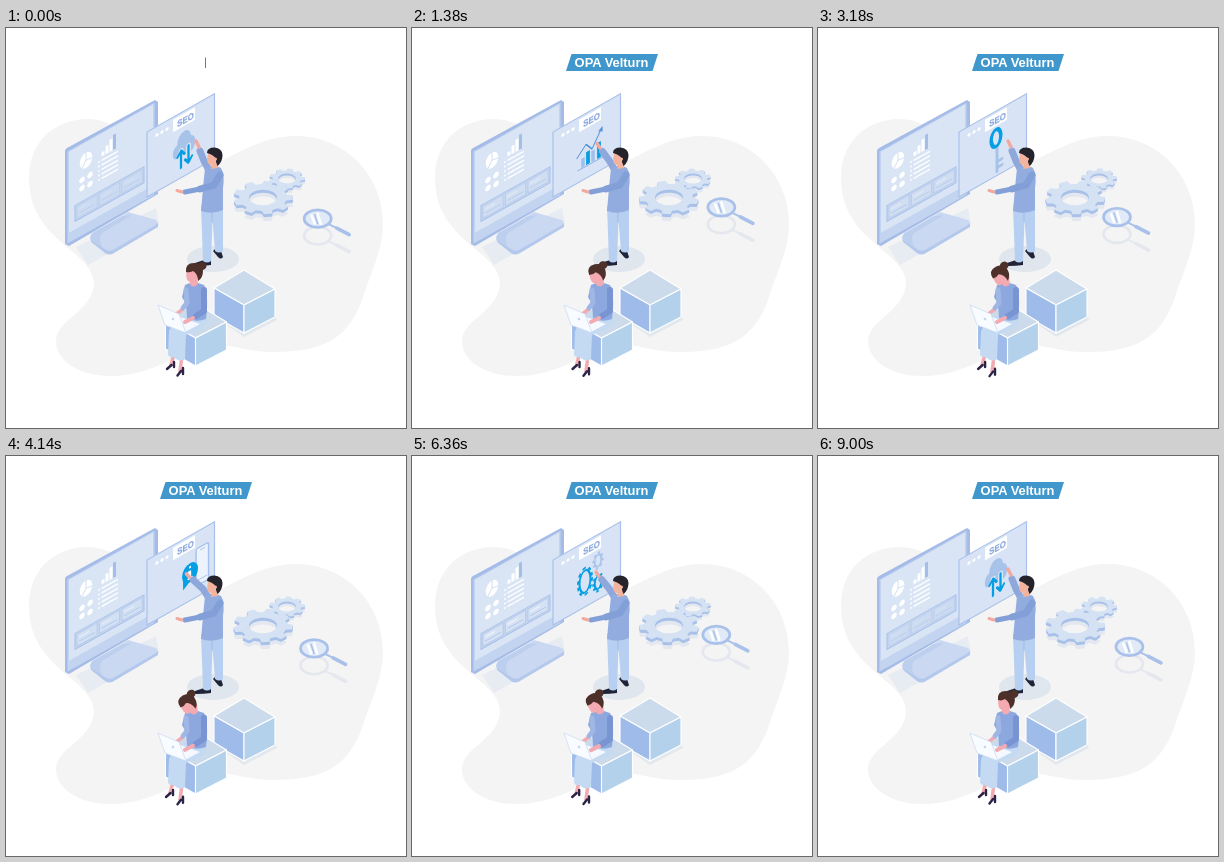
These frames come from a looping animation (400x400 px, 9030 ms). An HTML page:

```html
<!DOCTYPE html>
<html lang="en">
<head>
<meta charset="utf-8">
<style>
  html, body { margin: 0; width: 100%; height: 100%; overflow: hidden; background: #fff; }
  svg { display: block; width: 100vw; height: 100vh; }
  text { font-family: "Liberation Sans", Arial, sans-serif; font-weight: bold; text-anchor: middle; }
  .line { fill: none; stroke-linecap: round; stroke-linejoin: round; }
</style>
</head>
<body>
<svg viewBox="0 0 400 400">
  <defs>
    <clipPath id="panelClip"><path d="M1 1H67V64H1Z"/></clipPath>
    <g id="lens" class="line">
      <ellipse rx="13.5" ry="8.8" stroke-width="2.7"/>
      <path d="M12 6L19 9.500" stroke-width="2"/>
      <path d="M19 9.500L31.500 16" stroke-width="3.600"/>
    </g>
  </defs>

  <path fill="#f4f4f4" d="M23 150C23 112 50 91 82 91C118 91 135 127 170 138C212 150 238 108 290 108C340 108 377 148 377 196C377 222 364 246 356 272C342 310 318 324 268 324C240 324 222 315 205 317C175 321 150 348 105 348C70 348 50 331 50 313C50 292 86 284 88 256C88 222 23 214 23 150Z"/>

  <!-- Monitor -->
  <path fill="#e7ebf2" d="M70 219L150 180L153 197L82 237Z"/>
  <path fill="#b3c8ec" d="M84 209Q84 214 89 217L99 225Q103 228 108 225L152 199V195L104 222Z"/>
  <path fill="#cad8f1" d="M84 208L122 184L150 192Q153 194 150 197L107 222Q103 224 99 221L88 214Q84 211 84 208Z"/>
  <path fill="#bccfee" d="M86 205L116 188L126 187L96 205Q92 210 96 219L88 214Q83 210 86 205Z"/>
  <path fill="#a5bce8" d="M59 123Q59 121 61 120L149 72L152 74V166L63 218L59 216Z"/>
  <g transform="translate(59 122) skewY(-29.3)">
    <rect x="2.500" y="3" width="87" height="92" fill="#c3d4f0"/>
    <rect x="4" y="4" width="84" height="81" fill="#d9e5f5"/>
    <ellipse cx="21" cy="22" rx="6.300" ry="7.800" fill="#fff"/>
    <path d="M21 14V22L27 23M21 22L17 28" class="line" stroke="#c9d9f1" stroke-width=".7"/>
    <path d="M38 27V23M42 27V19M46 27V15" stroke="#fff" stroke-width="3"/>
    <path d="M49.500 27V12" stroke="#a4beea" stroke-width="3"/>
    <g fill="#fff">
      <circle cx="17" cy="39.500" r="2.800"/><circle cx="25" cy="39" r="2.800"/>
      <circle cx="17" cy="47.500" r="2.800"/><circle cx="25" cy="48" r="2.800"/>
    </g>
    <path d="M33 31H53M33 35.500H53M33 40H53M33 44.500H53M33 49H53" stroke="#fff" stroke-width="1.400" stroke-dasharray="2 1.500 16.500 0"/>
    <rect x="10" y="61" width="69" height="16" fill="#c4d5ef" stroke="#a9c0e8"/>
    <g id="cards">
      <path fill="#dfe9f7" stroke="#a9c0e8" stroke-width=".8" d="M12 63H32V75H12ZM34.500 63H54.500V75H34.500ZM57 63H77V75H57Z"/>
      <path stroke="#fff" stroke-width="1.400" d="M14 67H24M36.500 67H46.500M59 67H69"/>
      <path stroke="#a9c0e8" d="M14 71H30M36.500 71H52.500M59 71H75"/>
    </g>
  </g>

  <!-- Floating panel -->
  <g transform="translate(141 104) skewY(-29.5)">
    <rect width="67.500" height="65" fill="#d8e4f5" stroke="#a9c1ea" stroke-width="1.200"/>
    <g fill="#fff"><circle cx="10" cy="8.500" r="1.600"/><circle cx="15" cy="8.500" r="1.600"/><circle cx="20" cy="8.500" r="1.600"/></g>
    <rect x="26" y="2.500" width="22" height="12.500" fill="#fff"/>
    <text transform="translate(38.500 12.500) scale(.866 1)" font-size="9" fill="#8eabe0" stroke="#8eabe0" stroke-width=".3">SEO</text>
    <g clip-path="url(#panelClip)">
      <g class="icon">
        <path fill="#a8c3ea" d="M30 44Q25 43 26 36Q27 31 30 31Q31 20 38 20Q43 21 44 28Q49 30 48 38Q47 44 43 44Z"/>
        <path class="line" stroke="#d8e4f5" stroke-width="5" d="M34 55V38M41.500 37V54"/>
        <path class="line" stroke="#079fe3" stroke-width="2.300" d="M34 55V38M30.500 43L34 38L37.500 43M41.500 37V54M38 49L41.500 54L45 49"/>
      </g>
      <g class="icon">
        <path class="line" stroke="#8faee2" d="M25 53H51"/>
        <path stroke="#9fc0ec" stroke-width="3.500" d="M30 52V43M40 52V41"/>
        <path stroke="#079fe3" stroke-width="3.800" d="M35 52V39M46 52V36"/>
        <path class="line" stroke="#4f8fd4" stroke-width="1.200" d="M24 40L33 31L39 39L49 23M46 25L49 23V27"/>
      </g>
      <g class="icon">
        <path class="line" stroke="#a8c3ea" stroke-width="3" d="M38 36V61M39 51H43M39 57H43"/>
        <ellipse cx="37" cy="27" rx="4.800" ry="8.500" fill="none" stroke="#079fe3" stroke-width="3.500"/>
      </g>
      <g class="icon">
        <rect x="36" y="17" width="12.500" height="37" rx="2" fill="#edf3fc" stroke="#a8c3ea" stroke-width="1.500"/>
        <path stroke="#a8c3ea" d="M40 20H45M38 49H47"/>
        <ellipse cx="30" cy="37" rx="8" ry="9.500" fill="#079fe3"/>
        <path fill="#079fe3" d="M23 40L23 51L31 45Z"/>
        <path class="line" stroke="#fff" stroke-width="2.200" d="M30 36V42M28.500 36H30M28.500 42.500H32M30 31.500V31.600"/>
      </g>
      <g class="icon" fill="none">
        <g stroke="#079fe3" stroke-width="2">
          <ellipse cx="32" cy="39.500" rx="5.500" ry="11"/>
          <ellipse cx="32" cy="39.500" rx="7" ry="13.300" stroke-dasharray="3.400 3.200"/>
          <ellipse cx="45" cy="48" rx="3.300" ry="6.500"/>
          <ellipse cx="45" cy="48" rx="4.700" ry="8.500" stroke-dasharray="2.400 2.500"/>
        </g>
        <g stroke="#a8c3ea" stroke-width="1.700">
          <ellipse cx="45" cy="26" rx="3.300" ry="6"/>
          <ellipse cx="45" cy="26" rx="4.700" ry="7.800" stroke-dasharray="2.400 2.500"/>
        </g>
      </g>
    </g>
  </g>

  <g id="gears"></g>

  <!-- Magnifier -->
  <g id="glass">
    <use href="#lens" y="17" stroke="#e4e8ee"/>
    <ellipse rx="13" ry="8" fill="#e1eaf7"/>
    <path class="line" stroke="#fff" stroke-width="2.500" d="M-6 -3L-3 5M0 -5L3 5"/>
    <path class="line" stroke="#a9c1ea" stroke-width="1.500" d="M-3 -4L0 5"/>
    <use href="#lens" stroke="#a9c1ea"/>
  </g>

  <!-- Cubes -->
  <path fill="#e3e8ee" d="M208 288L238 309L271 292L269 287Z"/>
  <g id="cube" stroke="#fff" stroke-width="1.100" stroke-linejoin="round">
    <path fill="#cbdbeb" d="M238 242L269 261L238 277L208 260Z"/>
    <path fill="#9ebbe9" d="M208 260L238 277V305L208 288Z"/>
    <path fill="#b4d1ec" d="M238 277L269 261V289L238 305Z"/>
  </g>
  <use href="#cube" x="-48.500" y="33"/>

  <!-- Man -->
  <ellipse cx="207" cy="231" rx="26" ry="13" fill="#dfe6ed"/>
  <path fill="#1f2438" d="M198 232L205 233V237Q198 238 190 238Q187 237 189 235ZM209 221L215 223L217 229Q215 232 212 229L207 223Z"/>
  <path fill="#b7cff0" d="M195 178H217L217 223Q213 226 209 223L206.500 192L205 233Q201 236 197 233Z"/>
  <path class="line" stroke="#9bb8e5" stroke-width=".8" d="M206 184V194"/>
  <g id="raised" class="line">
    <path id="sleeve" stroke="#8ea8dc" stroke-width="7"/>
    <path id="hand" stroke="#f2aaa0" stroke-width="3.500"/>
  </g>
  <path fill="#92acdf" d="M199 140Q207 135 215 140Q219 146 217 160L217 182Q206 187 195 183L197 160Z"/>
  <path class="line" stroke="#829fd8" stroke-width="7" d="M214 147L208 157L194 161"/>
  <path class="line" stroke="#829fd8" stroke-width="5" d="M194 161L179 164"/>
  <path class="line" stroke="#f2aaa0" stroke-width="3" d="M176 164L171 162.500"/>
  <path fill="#f2b49f" d="M202.500 125Q200.500 131 201.500 134Q203 138 206 137L205 141L212 140L213 128Z"/>
  <path fill="#24232b" d="M201 125Q201 119.500 208.500 119.500Q216 120 216.500 127Q216.500 134 211.500 138L210 134Q210.500 130 207.500 128Q205 126 201 125Z"/>
  <circle cx="209.500" cy="131" r="1.500" fill="#f2b49f"/>

  <!-- Woman -->
  <g id="backFoot">
    <path class="line" stroke="#f3aab0" stroke-width="3.500" d="M168 326L165 337"/>
    <path class="line" stroke="#2b2348" stroke-width="2.400" d="M168 334V339M165.500 337L161 341"/>
  </g>
  <g id="frontFoot">
    <path class="line" stroke="#f3aab0" stroke-width="3.500" d="M176 328L174 343"/>
    <path class="line" stroke="#2b2348" stroke-width="2.400" d="M177 340V346M175 343L171.500 347.500"/>
  </g>
  <path fill="#c4daf3" d="M181 286L201 290Q201 300 190 302L180 307L179 331Q175 334 170 331L168 329Q164 330 162 327L163 303Q165 296 181 286Z"/>
  <path fill="#8da8de" d="M179 257Q187 252 198 257Q203 266 200 291Q190 295 181 290Q181 276 176 269Z"/>
  <path class="line" stroke="#f3aab0" stroke-width="3.500" d="M177 281L169 287"/>
  <path class="line" stroke="#9fb7e5" stroke-width="5" d="M180 262L181 275L177 280"/>
  <path fill="#f5f9ff" d="M158 297L179 304L194 296L174 289Z"/>
  <g class="line" id="typing">
    <path stroke="#7894d3" stroke-width="6" d="M198 262L198 283L190 288"/>
    <path stroke="#f3aab0" stroke-width="4" d="M187 290L179 294"/>
  </g>
  <path fill="#f8fbff" stroke="#c8d8f0" stroke-width=".7" d="M152 277L173 286L180 305L159 297Z"/>
  <circle cx="167" cy="291" r="1.300" fill="#c5d5ef"/>
  <path fill="#f3aab0" d="M183 248H191L192 256Q187 261 184 256Z"/>
  <g id="head">
    <path fill="#f3aab0" d="M181 241Q179 249 182 253Q188 255 193 250L194 241Z"/>
    <path fill="#4d3029" d="M180 244Q179 235 188 235Q196 235 197 243Q197 250 192 253Q192 246 187 243Q184 245 180 244Z"/>
    <ellipse cx="196" cy="238" rx="4.500" ry="4" fill="#4d3029"/>
  </g>

  <!-- Banner -->
  <path id="spark" stroke="#777" d="M199.500 29.500V40"/>
  <g id="banner">
    <path fill="#3f97cb" d="M159.500 26H246L240.500 43H154Z"/>
    <text x="199.500" y="38.700" font-size="12.900" fill="#fff">OPA Velturn</text>
  </g>
</svg>
<script>
const LOOP = 9030, TAU = Math.PI * 2;
const $ = id => document.getElementById(id);
const place = (id, value) => $(id).setAttribute('transform', value);
const ease = x => { x = Math.min(1, Math.max(0, x)); return x * x * (3 - 2 * x); };

function gearPath(teeth, outer, inner, hole) {
  const points = [];
  for (let i = 0; i < teeth; i++) {
    for (const [shift, r] of [[-.32, inner], [-.2, outer], [.2, outer], [.32, inner]]) {
      const a = (i + shift) / teeth * TAU;
      points.push((r * Math.cos(a)).toFixed(2) + ' ' + (r * Math.sin(a)).toFixed(2));
    }
  }
  return `M${points.join('L')}ZM${hole} 0A${hole} ${hole} 0 1 0 ${-hole} 0A${hole} ${hole} 0 1 0 ${hole} 0Z`;
}

// Each gear is a stack of flattened outlines: floor shadow, dark sides, light top.
function addGear(x, y, depth, d, spin) {
  const layers = [];
  for (const z of [depth * 2.3, ...Array.from({ length: depth + 1 }, (_, i) => depth - i)]) {
    const p = document.createElementNS('http://www.w3.org/2000/svg', 'path');
    p.setAttribute('d', d);
    p.setAttribute('fill-rule', 'evenodd');
    p.setAttribute('fill', z > depth ? '#e3e8f0' : z ? '#a9c1e9' : '#d5e2f4');
    $('gears').append(p);
    layers.push([p, y + z]);
  }
  return turn => layers.forEach(([p, top]) =>
    p.setAttribute('transform', `translate(${x} ${top}) scale(1 .56) rotate(${turn * spin})`));
}
const gears = [
  addGear(281, 150.5, 2, gearPath(9, 18, 14.5, 9), -360),
  addGear(257, 169.5, 3, gearPath(9, 30, 24, 14), 360)
];

// Raised arm: time and amount of the swipe.
const swipes = [[0, 0], [440, 1], [1380, .5], [1700, 0], [2190, 1], [2900, 0], [3400, 0], [3940, 1],
  [5100, .55], [5350, 0], [5690, 1], [6360, .6], [6900, 0], [7440, 1], [8300, 0], [LOOP, 0]];
function swipeAt(t) {
  const i = swipes.findIndex(k => k[0] > t);
  const [t0, a] = swipes[i - 1], [t1, b] = swipes[i];
  return a + (b - a) * ease((t - t0) / (t1 - t0));
}

const icons = document.querySelectorAll('.icon');
const start = performance.now();

function draw(now) {
  const t = Math.max(0, now - start) % LOOP, turn = t / LOOP;

  $('spark').style.display = t < 60 ? '' : 'none';
  $('banner').style.display = t < 60 ? 'none' : '';
  const grow = 1 - (1 - Math.min(1, t / 930)) ** 2;
  place('banner', `translate(199.5 34.5) scale(${grow} ${.7 + .3 * grow}) translate(-199.5 -34.5)`);

  let slide = 0;
  for (let i = 0; i < 5; i++) slide += ease((t - 45 - 1750 * i) / 840);
  icons.forEach((icon, i) => {
    const d = (i - slide + 7.5) % 5 - 2.5;
    icon.setAttribute('transform', `translate(${d * 64} 0)`);
  });

  const s = swipeAt(t), x = 190 - 10 * s, y = 113 + 5 * s;
  $('sleeve').setAttribute('d', `M204 144L${198 - s} 133L${x + 4 + 3 * s} ${y + 10 - 4 * s}`);
  $('hand').setAttribute('d', `M${x + 3} ${y + 6 - 3 * s}L${x} ${y}`);

  gears.forEach(rotate => rotate(turn));

  const orbit = TAU * (.125 - 2 * turn);
  place('glass', `translate(${306 + 8 * Math.cos(orbit)} ${185.7 + 7 * Math.sin(orbit)})`);

  const nod = Math.sin(Math.PI * turn);
  place('head', `translate(0 ${2.5 * nod}) rotate(${-32 * nod} 186 256)`);
  place('typing', `translate(0 ${.4 * Math.sin(TAU * turn * 10)})`);
  place('backFoot', `translate(${-nod} 0)`);
  place('frontFoot', `translate(0 ${.7 * nod})`);
  $('cards').style.opacity = .5 - .2 * Math.cos(TAU * turn * 5);

  requestAnimationFrame(draw);
}
draw(start);
</script>
</body>
</html>
```
